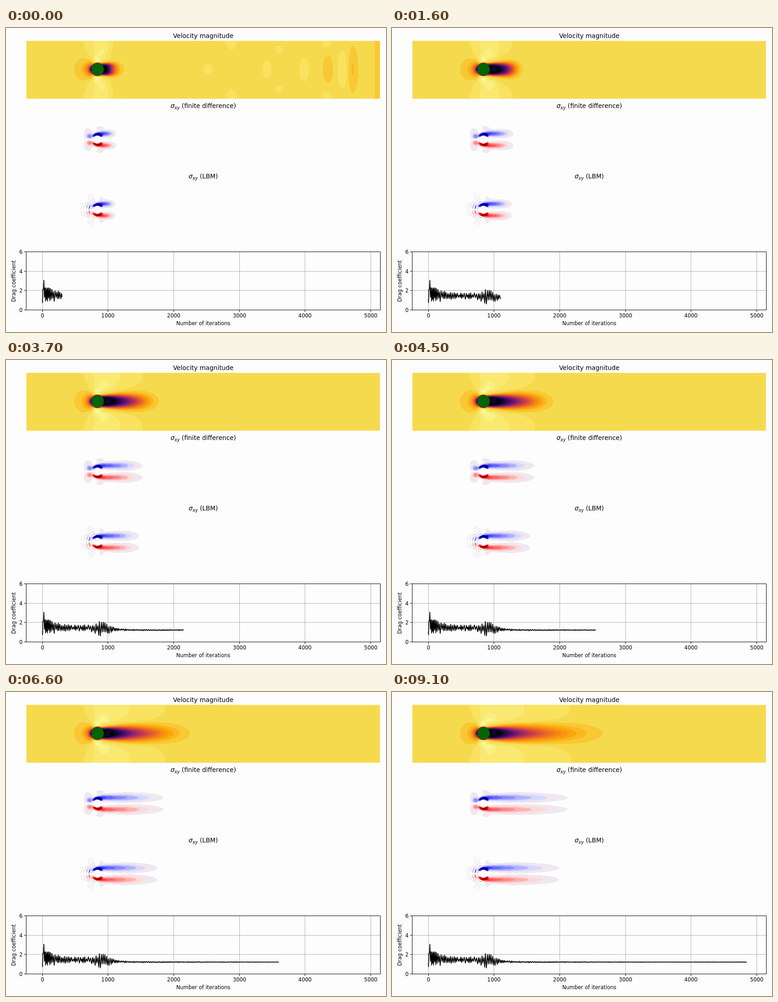
Recreate the animation shown at these times as an HTML page with a canvas. Size 837 by 669 pixels, loop 9.2 s.

```html
<!DOCTYPE html>
<html lang="en">
<head>
<meta charset="utf-8">
<title>Flow past a cylinder</title>
<style>
  html, body { margin: 0; width: 100%; height: 100%; overflow: hidden; background: #fdfdfd; }
  svg, canvas { position: absolute; left: 0; top: 0; width: 837px; height: 669px; }
  text { font: 11.5px "DejaVu Sans", sans-serif; fill: #000; text-anchor: middle; }
  .title { font-size: 13.8px; }
  .it { font-style: italic; }
  .sub { font-style: italic; font-size: 9.7px; }
  .end { text-anchor: end; }
  .grid { stroke: #b0b0b0; }
  .tick { stroke: #000; }
</style>
</head>
<body>
<svg viewBox="0 0 837 669">
  <text class="title" x="434.5" y="22">Velocity magnitude</text>
  <text class="title" x="434.5" y="176"><tspan class="it">σ</tspan><tspan class="sub" dy="2.5">xy</tspan><tspan dy="-2.5"> (finite difference)</tspan></text>
  <text class="title" x="434.5" y="331"><tspan class="it">σ</tspan><tspan class="sub" dy="2.5">xy</tspan><tspan dy="-2.5"> (LBM)</tspan></text>
  <g id="axes"></g>
  <rect x="44.5" y="492.5" width="780" height="128" fill="none" stroke="#000"/>
  <text x="434.5" y="654">Number of iterations</text>
  <text transform="translate(21 557) rotate(-90)">Drag coefficient</text>
</svg>
<canvas id="view" width="837" height="669"></canvas>
<script>
const ctx = document.getElementById('view').getContext('2d');
const { exp, abs, max, min, sin, hypot, log, floor, round, atan2, PI } = Math;
const plotX = it => 80.2 + it * 0.1446;
const plotY = c => 620.5 - c * 21.25;
const smooth = (v, a, b) => { const s = max(0, min(1, (v - a) / (b - a))); return s * s * (3 - 2 * s); };
const bell = (u, v = 0) => exp(-u * u - v * v);

// axes
let marks = '';
for (let it = 0; it <= 5000; it += 1000) {
  const x = floor(plotX(it)) + 0.5;
  marks += `<path class="grid" d="M${x} 493V620"/><path class="tick" d="M${x} 620.5v4.5"/><text x="${x}" y="637">${it}</text>`;
}
for (let c = 0; c <= 6; c += 2) {
  const y = floor(plotY(c) - 0.5) + 0.5;
  marks += `<path class="grid" d="M45 ${y}H824"/><path class="tick" d="M44.5 ${y}h-4.5"/><text class="end" x="36.5" y="${y + 4.5}">${c}</text>`;
}
document.getElementById('axes').innerHTML = marks;

// colours
const hex = s => [0, 2, 4].map(i => parseInt(s.substr(i, 2), 16));
const heat = '000004 160b39 420a68 6a176e 932667 bc3754 dd513a f37819 fca50a f6d746 fcffa4'.split(' ').map(hex);
function heatAt(v) {
  const p = min(0.9999, max(0, v)) * 10, i = floor(p);
  return heat[i].map((c, j) => c + (heat[i + 1][j] - c) * (p - i));
}
const LOW = -32, HIGH = 5;
const speedColors = [];
for (let n = LOW; n <= HIGH; n++) speedColors.push(heatAt(abs(0.908 + n * (n < 0 ? 0.036 : 0.0185))));

function stressColor(n, blue) {
  if (n === 1) return [240, 232, 239];
  const t = min(1, (n - 1) / 13);
  const pale = 255 * max(0, 1 - 2 * t), dark = max(0, t - 0.5);
  return blue ? [pale, pale, 255 - dark * 356] : [255 - dark * 254, pale, pale];
}
const stressColors = [true, false].map(b => Array.from({ length: 16 }, (_, n) => stressColor(n, b)));

// start-up waves: ovals crowding together towards the outlet, and a few near the walls
const waves = [];
for (let i = 0; i < 6; i++) {
  const sign = i > 2 && i % 2 ? -1 : 1;
  waves.push({ x: 800 - 355 * 0.635 ** i, y: 0, rx: 9, ry: 12 + 5 * i, a: sign * (0.9 + 0.15 * i) });
}
for (let i = 0; i < 3; i++) waves.push({ x: 497 + 105 * i, y: 63 - 20 * (i % 2), rx: 12 - 4 * (i % 2), ry: 20 - 12 * (i % 2), a: 0.9 });

function waveField(x, Y) {
  let q = -1.1 * smooth(x, 806, 818);
  for (const w of waves) q += w.a * exp(-0.6 * (((x - w.x) / w.rx) ** 2 + ((Y - w.y) / w.ry) ** 2));
  return q;
}

function speedField(it) {
  const early = exp(-(it - 300) / 300);
  const reach = 20.5 + 0.0464 * it + 9 * early;
  const decay = d => 1 / (1 + (d / 72) ** 1.7);
  const cut = log(50 * decay(reach)), power = 4.3 - 2.5 * early;
  const far = 226 + 0.0345 * it, near = 220 + 0.0148 * it;
  const fade = 1 - (it - 300) / 480;

  // everything depending on x alone is worked out once per column
  return x => {
    const X = x - 201.5, d = max(0, X - 14);
    const core = (25 + 3 * (1 - bell(d / 5))) * decay(d) * exp(-cut * (d / reach) ** power) * smooth(X, -4, 12);
    const width = 12.8 + 0.025 * d, shape = 2 + 3.5 * exp(-d / 24);
    return y => {
      const Y = abs(y - 91), r = max(14, hypot(X, Y));
      let q = 0;
      if (x < 520) {
        const front = X < 0 ? 25 * (14 / r) ** 3 * (-X / r) ** 3 : 0;
        const layer = 20 * exp(-(r - 14) / 0.8);
        const wake = core * exp(-((Y / width) ** shape));
        const bend = 0.05 * max(0, 52 - Y) ** 2;
        const left = 0.5 + (x - 168 - (65 - Y) * 0.3) / 22;
        const right = 0.5 + (far - bend - x) / (far - near);
        const side = max(0, min(left, right, 2.1)) * smooth(Y, 19, 29);
        const blob = 1.7 * bell((X - 13) / 15, (Y - 29) / 13) * smooth(Y, 14, 26) + 3.5 * bell((X + 1) / 9, (Y - 20) / 7);
        q = side + blob - max(front, layer, wake);
      }
      return fade > 0 && x > 420 ? q + fade * waveField(x, Y) : q;
    };
  };
}

function stressField(it, cy, rate, ripple) {
  const reach = 31 + rate * it;
  const decay = d => 7 / (1 + d / 75);
  const cut = log(decay(reach) * 2);
  return x => {
    const X = x - 201.5, d = max(0, X);
    const core = decay(d) * exp(-cut * (d / reach) ** 4) * smooth(X, -8, 12);
    const width = min(9, 5 + 0.06 * d);
    return y => {
      const Y = abs(y - cy), r = hypot(X, Y);
      if (r < 8 || Y < 1.5) return 0;
      let v = core * bell((Y - 13) / width);
      v += 12 * bell((r - 11.5) / 3) * smooth(Y / r, 0.35, 1);
      v += (ripple ? 2.5 : 4) * bell((X + 17) / 7, (Y - 7) / 6);
      v += 0.9 * bell((X + 21) / 11, (Y - 15) / 13) + 0.8 * bell((X - 5) / 11, (Y - 26) / 5);
      if (ripple && X < 6) {
        const arcs = sin(r * 1.1) * (0.6 + 0.7 * sin(atan2(Y, X) * 7));
        v += arcs * (1.4 * bell((r - 33) / 10) + 2.5 * bell((r - 19) / 5)) - 0.4 * smooth(r, 14, 20);
      }
      return v * smooth(r, 7, 10);
    };
  };
}

const buffer = document.createElement('canvas').getContext('2d');
function paint(x0, y0, w, h, field, color) {
  const img = ctx.createImageData(w, h), px = img.data;
  for (let i = 0; i < w; i++) {
    const column = field(x0 + i + 0.5);
    for (let j = 0; j < h; j++) {
      const y = y0 + j + 0.5, c = color(column(y), y);
      if (!c) continue;
      const p = (j * w + i) * 4;
      px[p] = c[0]; px[p + 1] = c[1]; px[p + 2] = c[2]; px[p + 3] = 255;
    }
  }
  buffer.canvas.width = w;
  buffer.canvas.height = h;
  buffer.putImageData(img, 0, 0);
  ctx.drawImage(buffer.canvas, x0, y0);
}

// drag history: a seeded zigzag whose size follows the start-up, a later burst and the calm end
let seed = 7;
const random = () => (seed = (seed * 16807) % 2147483647) / 2147483647;
const dragMean = it => 1.23 + 0.2 * (1 - smooth(it, 700, 1400)) + 0.2 * exp(-it / 150) + bell((it - 17) / 10);
const dragSwing = it => 0.55 * bell(it / 240) + 0.55 * bell((it - 890) / 160) +
  0.2 * (1 - smooth(it, 600, 1200)) + 0.1 * exp(-max(0, it - 1100) / 900) + 0.015;
const drag = [[0, 1.1], [2, 0.75]];
for (let it = 5, up = 1; it <= 4850; up = -up) {
  drag.push([it, dragMean(it) + up * dragSwing(it) * (0.3 + 0.7 * random())]);
  it += (it < 130 ? 4 : 9) + 8 * random();
}
drag.push([4850, 1.23]);

function drawDrag(it) {
  ctx.beginPath();
  for (let i = 0; i < drag.length; i++) {
    const [n, c] = drag[i];
    if (n > it) {
      const [m, b] = drag[i - 1];
      ctx.lineTo(plotX(it), plotY(b + (c - b) * (it - m) / (n - m)));
      break;
    }
    ctx.lineTo(plotX(n), plotY(c));
  }
  ctx.strokeStyle = '#000';
  ctx.lineWidth = 1.75;
  ctx.lineJoin = 'round';
  ctx.stroke();
}

function drawSpeed(it, width) {
  ctx.save();
  ctx.beginPath();
  ctx.rect(45, 28.5, 778.6, 127);
  ctx.clip();
  ctx.fillStyle = `rgb(${speedColors[-LOW].map(round)})`;
  ctx.fillRect(45, 28, 779, 128);
  paint(45, 28, width, 128, speedField(it), q => speedColors[max(LOW, min(HIGH, round(q))) - LOW]);
  ctx.restore();
  ctx.beginPath();
  ctx.arc(201.7, 91, 13.8, 0, 2 * PI);
  ctx.fillStyle = '#006400';
  ctx.fill();
}

function drawStress(it, cy, rate, ripple) {
  paint(160, floor(cy) - 38, 250, 76, stressField(it, cy, rate, ripple), (v, y) => {
    const n = round(v);
    return n > 0 ? stressColors[y < cy ? 0 : 1][min(15, n)] : null;
  });
}

function draw(step) {
  const it = 300 + 50 * step;
  ctx.clearRect(0, 0, 837, 669);
  drawSpeed(it, step < 10 ? 779 : 460);
  drawStress(it, 245.5, 0.0317, false);
  drawStress(it, 400, 0.028, true);
  drawDrag(it);
}

const t0 = performance.now();
let shown = -1;
function tick() {
  const step = floor(((performance.now() - t0) % 9200) / 100);
  if (step !== shown) draw(shown = step);
  requestAnimationFrame(tick);
}
tick();
</script>
</body>
</html>
```
